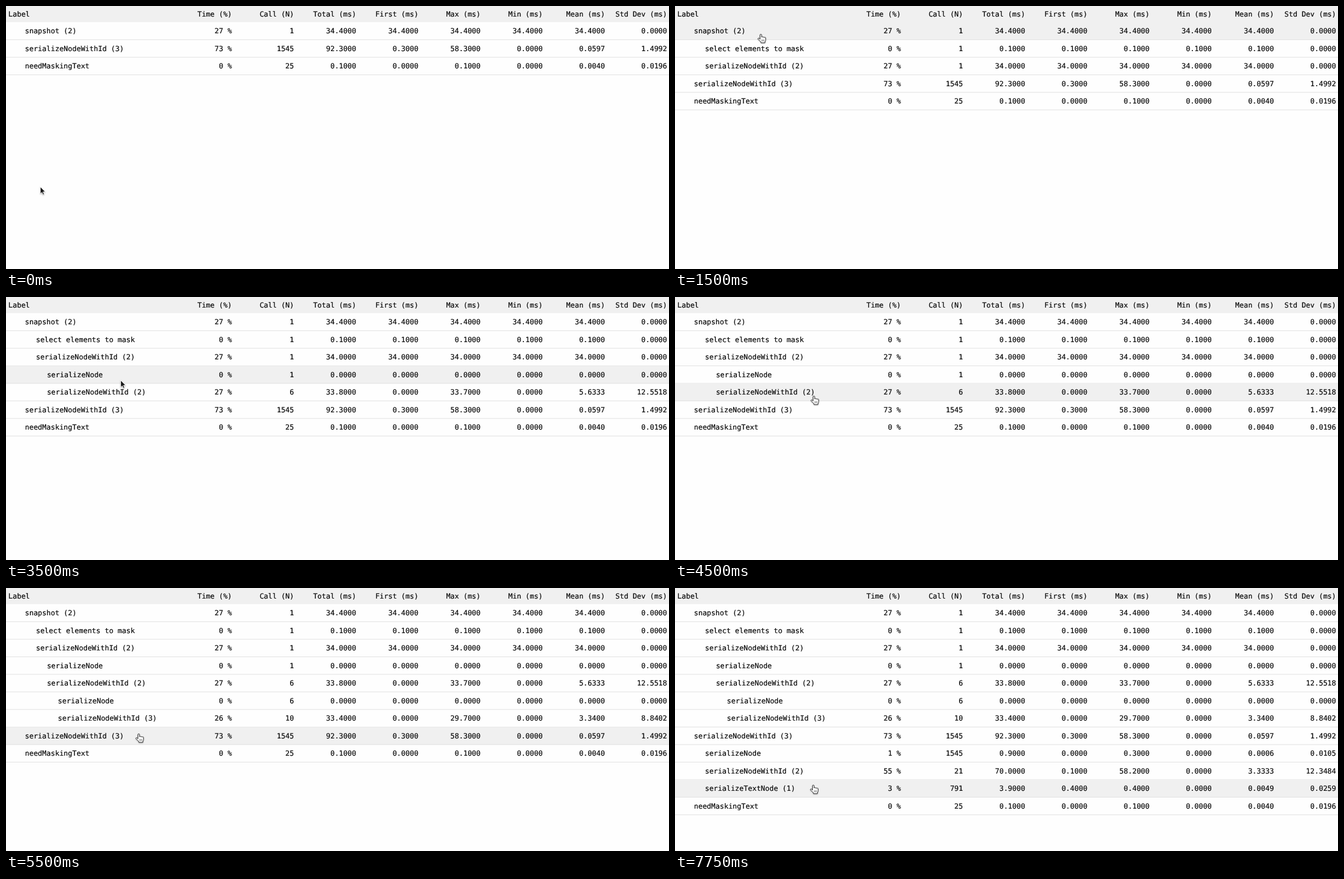
An HTML page for the animation above (8000 ms loop, 1188 px wide and 472 px high).

```html
<!DOCTYPE html>
<html lang="en">
<head>
<meta charset="utf-8">
<title>Profile table</title>
<style>
  html, body { margin: 0; width: 100%; height: 100%; overflow: hidden; background: #fefefe; }
  svg { display: block; width: 1188px; height: 472px; }
  text {
    font: 12.81px "DejaVu Sans Mono", "Liberation Mono", monospace;
    text-rendering: geometricPrecision; white-space: pre;
    fill: #0c0c0c; stroke: #0c0c0c; stroke-width: .22px;
  }
  .num { text-anchor: end; }
  .bar { fill: #f0f0f0; }
  .line { fill: #e0e0e0; }
  .row .bar { visibility: hidden; }
  .row.hover .bar { visibility: visible; }
  #arrow, #hand { filter: drop-shadow(0 1px 1px rgba(0, 0, 0, .3)); }
</style>
</head>
<body>
<svg viewBox="0 0 1188 472">
  <g id="table"></g>
  <path id="arrow" d="M.5 .5V13L3.4 10.4L5.3 14.8L7.4 13.9L5.6 9.6H9.4Z"
    fill="#1a1a1a" stroke="#fff" stroke-width=".9"/>
  <g id="hand" fill="#fff" stroke="#222" stroke-linecap="round" stroke-linejoin="round">
    <path d="M4.4 9.4V2.1a1.4 1.4 0 0 1 2.8 0V6a1.4 1.4 0 0 1 2.6.3a1.3 1.3 0 0 1 2.4.5a1.2 1.2 0 0 1 2.2 1V10.6q0 2-1.2 3.4V16H6V14.4Q3.6 12.4 1 9.6a1.2 1.2 0 0 1 1.8-1.6z"/>
    <path d="M7.6 10.5v2.6M9.5 10.5v2.6M11.4 10.5v2.6" stroke-width=".6"/>
  </g>
</svg>
<script>
const LOOP = 8000, TICK = 250, HEAD = 29, PITCH = 31.5;
const HEADINGS = ["Time (%)", "Call (N)", "Total (ms)", "First (ms)",
  "Max (ms)", "Min (ms)", "Mean (ms)", "Std Dev (ms)"];

// A label called once has total = first = max = min.
const once = (label, total, more) =>
  ({ label, calls: 1, total, first: total, max: total, min: total, dev: 0, ...more });
const many = (label, calls, total, more) =>
  ({ label, calls, total, first: 0, max: 0, min: 0, dev: 0, ...more });

const TREE = [
  once("snapshot (2)", 34.4, { opens: 1500, children: [
    once("select elements to mask", 0.1),
    once("serializeNodeWithId (2)", 34, { opens: 2750, children: [
      once("serializeNode", 0),
      many("serializeNodeWithId (2)", 6, 33.8, { max: 33.7, dev: 12.5518, opens: 4750, children: [
        many("serializeNode", 6, 0),
        many("serializeNodeWithId (3)", 10, 33.4, { max: 29.7, dev: 8.8402 })
      ] })
    ] })
  ] }),
  many("serializeNodeWithId (3)", 1545, 92.3, { first: 0.3, max: 58.3, dev: 1.4992, opens: 6000, children: [
    many("serializeNode", 1545, 0.9, { max: 0.3, dev: 0.0105 }),
    many("serializeNodeWithId (2)", 21, 70, { first: 0.1, max: 58.2, dev: 12.3484 }),
    many("serializeTextNode (1)", 791, 3.9, { first: 0.4, max: 0.4, dev: 0.0259 })
  ] }),
  many("needMaskingText", 25, 0.1, { max: 0.1, dev: 0.0196 })
];
const GRAND_TOTAL = TREE.reduce((sum, node) => sum + node.total, 0);

// Pointer glides that slow down towards their end; power sets how sharply.
const START = { x: 61, y: 324 };
const GLIDES = [
  { from: 500, to: 1250, x: 148, y: 50, power: 6.3 },
  { from: 1750, to: 2500, x: 183, y: 103, power: 2.8 },
  { from: 3250, to: 3500, x: 205, y: 149, power: 1 },
  { from: 3500, to: 4000, x: 226, y: 196, power: 1.6 },
  { from: 4000, to: 4500, x: 243, y: 177, power: 2 },
  { from: 5000, to: 5500, x: 232, y: 261, power: 1.4 },
  { from: 7000, to: 7750, x: 242, y: 353, power: 4.4 }
];

const $ = id => document.getElementById(id);

function add(parent, tag, attrs, content = "") {
  const el = document.createElementNS("http://www.w3.org/2000/svg", tag);
  for (const key in attrs) el.setAttribute(key, attrs[key]);
  el.textContent = content;
  return parent.appendChild(el);
}

function addTexts(group, x, y, label, values) {
  add(group, "text", { x, y }, label);
  values.forEach((value, i) =>
    add(group, "text", { class: "num", x: 404.6 + 111.42 * i, y }, value));
}

function cells({ calls, total, first, max, min, dev }) {
  const times = [total, first, max, min, total / calls, dev];
  return [`${Math.round(100 * total / GRAND_TOTAL)} %`, calls, ...times.map(ms => ms.toFixed(4))];
}

const table = $("table");
const rows = [];

function addRows(nodes, depth, start) {
  for (const node of nodes) {
    const group = add(table, "g", { class: "row" });
    add(group, "rect", { class: "bar", width: 1188, height: PITCH });
    add(group, "rect", { class: "line", y: PITCH - 0.5, width: 1188, height: 1 });
    addTexts(group, 34 + 19.7 * depth, 20.3, node.label, cells(node));
    rows.push({ start, expandable: node.label.endsWith(")"), group });
    addRows(node.children || [], depth + 1, node.opens);
  }
}

add(table, "rect", { class: "bar", width: 1188, height: HEAD });
addTexts(table, 4.3, 18.7, "Label", HEADINGS);
addRows(TREE, 0, 0);

function pointerAt(time) {
  let { x, y } = START;
  for (const glide of GLIDES) {
    const part = Math.min(1, Math.max(0, (time - glide.from) / (glide.to - glide.from)));
    const eased = 1 - (1 - part) ** glide.power;
    x += (glide.x - x) * eased;
    y += (glide.y - y) * eased;
  }
  return { x, y };
}

function draw(time) {
  const { x, y } = pointerAt(time);
  const visible = rows.filter(row => row.start <= time);
  const hovered = visible[Math.floor((y - HEAD) / PITCH)];

  for (const row of rows) {
    const index = visible.indexOf(row);
    row.group.style.display = index < 0 ? "none" : "";
    row.group.setAttribute("transform", `translate(0 ${HEAD + PITCH * index})`);
    row.group.classList.toggle("hover", row === hovered);
  }

  const pointing = Boolean(hovered && hovered.expandable);
  for (const [id, shown] of [["hand", pointing], ["arrow", !pointing]]) {
    $(id).style.display = shown ? "" : "none";
    $(id).setAttribute("transform", `translate(${x} ${y})`);
  }
}

const begin = performance.now();
let shownTick = -1;

function frame() {
  const tick = Math.floor((performance.now() - begin) % LOOP / TICK);
  if (tick !== shownTick) draw(tick * TICK);
  shownTick = tick;
  requestAnimationFrame(frame);
}
frame();
</script>
</body>
</html>
```
